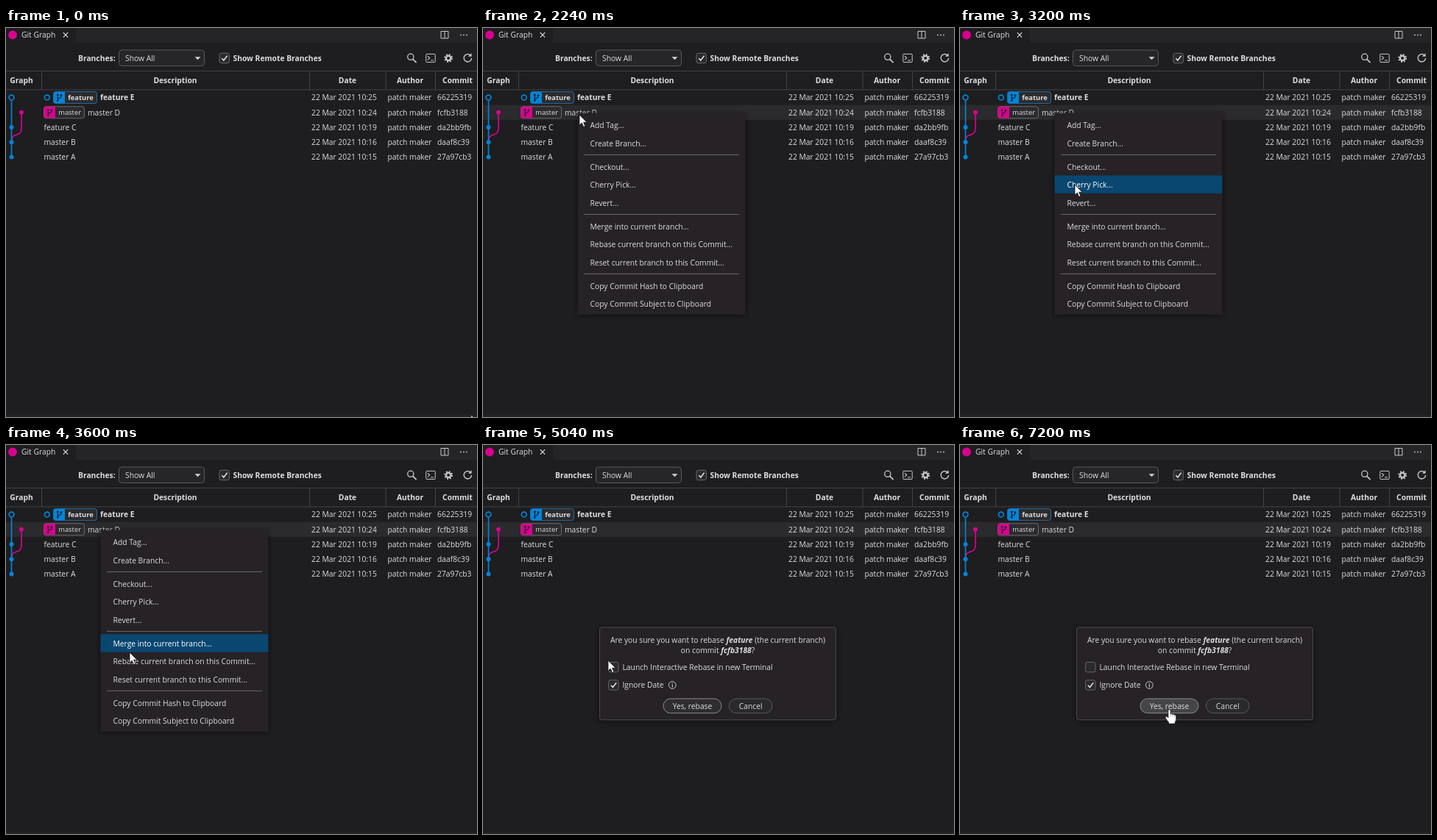
An HTML page that plays this animation: 640 px wide and 529 px high, repeating every 8 s.

```html
<!DOCTYPE html>
<html lang="en">
<head>
<meta charset="utf-8">
<title>Commit graph</title>
<style>
html, body { margin: 0; width: 100%; height: 100%; overflow: hidden; background: #1e1d20; }
svg { display: block; width: 640px; height: 529px; }
text { font: 10.3px "Open Sans", "Noto Sans", sans-serif; fill: #dedde0; white-space: pre; }
.b { font-weight: 700; }
.bi { font-weight: 700; font-style: italic; }
.s { font-size: 9.4px; }
.m { text-anchor: middle; }
.on { fill: #fff; }
</style>
</head>
<body>
<svg id="stage" viewBox="0 0 640 529" xmlns="http://www.w3.org/2000/svg">
  <defs>
    <filter id="shade" x="-20%" y="-20%" width="140%" height="140%">
      <feDropShadow dx="0" dy="1" stdDeviation="4" flood-color="#000" flood-opacity=".55"/>
    </filter>
  </defs>
  <rect width="640" height="529" fill="#1e1d20"/>
  <rect y="525.5" width="640" height="3.5" fill="#232225"/>
  <g id="bar"></g>
  <g id="table"></g>
  <g id="menu"></g>
  <g id="dialog"></g>
  <path id="arrow" d="M0 0V14.2L3.3 11.1L5.7 16.6L7.9 15.6L5.6 10.3H10.1Z" fill="#fff" stroke="#111" stroke-width=".8"/>
  <g id="hand" stroke="#151515" stroke-width=".8" stroke-linejoin="round">
    <path fill="#fff" d="M-1.6 1.2Q0 -1 1.6 1.2V6.4Q3.8 5 4.4 7Q6.3 5.6 7 7.6Q9.2 7 9.2 9.2V13.5Q9.2 15.5 7.7 17.2V19.6H-1V17.6Q-3 15.5 -5.2 11.8Q-6.2 9.6 -4.1 9.4Q-2.7 9.7 -1.6 11.4Z"/>
    <path fill="none" stroke="#777" stroke-width=".6" d="M1.6 7V10M4.4 7.2V10M7 8V10.4"/>
  </g>
</svg>
<script>
const BG = '#1e1d20', PANEL = '#252427', INK = '#c9c8ca', BLUE = '#0085d9', PINK = '#d9008f';
const LOOP = 8000, STEP = 80, PITCH = 20.2, TOP = 84.5;
const $ = id => document.getElementById(id);
const mid = row => TOP + PITCH * (row + 0.5);

const text = (x, y, str, cls = '') => `<text x="${x}" y="${y + 3.7}" class="${cls}">${str}</text>`;
const rect = (x, y, w, h, fill, stroke = 'none', r = 0, extra = '') =>
  `<rect x="${x}" y="${y}" width="${w}" height="${h}" rx="${r}" fill="${fill}" stroke="${stroke}" ${extra}/>`;
const line = (d, color = INK, w = 1, fill = 'none') =>
  `<path d="${d}" fill="${fill}" stroke="${color}" stroke-width="${w}"/>`;
const ring = (x, y, r, color, w, extra = '') =>
  `<circle cx="${x}" cy="${y}" r="${r}" fill="none" stroke="${color}" stroke-width="${w}" ${extra}/>`;
const dot = (x, y, r, color) => `<circle cx="${x}" cy="${y}" r="${r}" fill="${color}"/>`;

function checkbox(x, y, ticked) {
  const box = rect(x, y, 13.4, 13.4, '#2a292c', '#69686b', 2.5);
  return box + (ticked ? line(`M${x + 3.3} ${y + 7}l2.5 2.7 4.8-6.2`, '#e4e4e4', 1.5) : '');
}

function drawBar() {
  const tab = rect(0, 0, 640, 20, PANEL) + rect(0, 0, 95, 20, BG) +
    dot(9, 9.5, 6, PINK) + text(21, 9.5, 'Git Graph') +
    line('M77.8 6.2l6.4 6.4M84.2 6.2l-6.4 6.4', '#dddcde', 1.2);
  const split = line('M591 4.5h10v9.5h-10zM596 4.5v9.5') +
    [618, 622, 626].map(x => dot(x, 9.5, 0.9, INK)).join('');
  const filters = text(98, 41, 'Branches:', 'b') +
    rect(153.5, 30, 116, 21.5, '#262528', '#59585b', 4) + text(162, 41, 'Show All') +
    line('M256.5 39.2h8l-4 4z', 'none', 0, '#d2d1d3') +
    checkbox(290, 34.3, true) + text(308.5, 41, 'Show Remote Branches', 'b');
  const icons = ring(549.8, 39.3, 4.1, INK, 1.3) + line('M552.8 42.4l4.8 4.8', INK, 1.7) +
    rect(570.8, 35.4, 12.4, 11.2, 'none', INK, 1) + line('M573 38.2l2.7 2.6-2.7 2.6M577 44h4', INK, 1.1) +
    ring(601.2, 41, 3.2, INK, 2.2) + ring(601.2, 41, 4.9, INK, 2, 'stroke-dasharray="1.924"') +
    line('M631.2 37.2A5.2 5.2 0 1 0 632.6 41', INK, 1.4) + line('M632.6 34.2v4.6h-4.6z', 'none', 0, INK);
  $('bar').innerHTML = tab + split + filters + icons;
}

const branchIcon = (x, y) =>
  `<g transform="translate(${x} ${y})">` + line('M-2.2-3V3.4M2.4-2.2Q2.4.8-2.2 1.4', '#251d2a', 1.2) +
  [[-2.2, -3.7], [2.4, -3], [-2.2, 4]].map(p => dot(...p, 1.4, '#251d2a')).join('') + '</g>';

function badge(x, y, w, name, color, edge, cls) {
  return rect(x, y - 8, w, 16, '#2c2b2e', edge, 3) +
    line(`M${x + 15.5} ${y - 7.8}H${x + 3}q-3 0-3 3v9.6q0 3 3 3h12.5z`, 'none', 0, color) +
    branchIcon(x + 8, y) + text(x + 19.7, y - 0.2, name, 's ' + cls);
}

function drawTable() {
  const heads = [[21, 'Graph'], [230, 'Description'], [464, 'Date'], [549, 'Author'], [613.5, 'Commit']];
  const rows = [
    [128, 'feature E', '25', '66225319'], [111, 'master D', '24', 'fcfb3188'],
    [51.5, 'feature C', '19', 'da2bb9fb'], [51.5, 'master B', '16', 'daaf8c39'],
    [51.5, 'master A', '15', '27a97cb3']
  ];
  let out = rect(0, TOP, 640, PITCH, '#2b2a2d', 'none', 0, 'id="hover"');
  out += line('M0 58.5H640M0 84H640M48.5 58.5V84M412.5 58.5V84M516 58.5V84M583.5 58.5V84', '#434245');
  out += heads.map(([x, s]) => text(x, 71, s, 'b m')).join('');
  rows.forEach(([x, name, min, hash], i) => {
    const y = mid(i);
    out += text(x, y, name, i ? '' : 'b') + text(415, y, '22 Mar 2021 10:' + min) +
      text(518.5, y, 'patch maker') + text(586, y, hash);
  });
  out += line(`M21 ${mid(1)}V${mid(2)}C21 ${mid(3) - 4} 7.5 ${mid(2) + 4} 7.5 ${mid(3)}`, PINK, 1.7);
  out += line(`M7.5 ${mid(0) + 3.4}V${mid(4)}`, BLUE, 1.7) + ring(7.5, mid(0), 3.4, BLUE, 1.7);
  out += [2, 3, 4].map(i => dot(7.5, mid(i), 3, BLUE)).join('') + dot(21, mid(1), 3, PINK);
  out += ring(55.8, mid(0), 3.4, BLUE, 1.7);
  out += badge(64.5, mid(0), 59, 'feature', BLUE, '#2a6c9c', 'b');
  out += badge(51.5, mid(1), 55, 'master', PINK, '#6a696c', '');
  $('table').innerHTML = out;
}

const ITEMS = [
  [132.5, 'Add Tag...'], [157, 'Create Branch...'], [189, 'Checkout...'], [213.2, 'Cherry Pick...'],
  [238, 'Revert...'], [270, 'Merge into current branch...'], [294.3, 'Rebase current branch on this Commit...'],
  [319, 'Reset current branch to this Commit...'], [351, 'Copy Commit Hash to Clipboard'],
  [375.3, 'Copy Commit Subject to Clipboard']
];

function drawMenu() {
  $('menu').innerHTML = rect(128.5, 115.8, 227.8, 274, PANEL, 'none', 1, 'filter="url(#shade)"') +
    line('M137 172.4H348M137 253.4H348M137 334.3H348', '#69686b') +
    rect(128.5, 0, 227.8, 24.4, '#094771', 'none', 0, 'id="pick"') +
    ITEMS.map(([y, s]) => text(145.5, y, s, 'item')).join('');
}

function drawDialog() {
  const em = s => `<tspan class="bi">${s}</tspan>`;
  $('dialog').innerHTML = rect(158.5, 248, 321, 125.7, PANEL, '#4a494c', 3, 'filter="url(#shade)"') +
    text(319, 265, `Are you sure you want to rebase ${em('feature')} (the current branch)`, 'm') +
    text(319, 279, `on commit ${em('fcfb3188')}?`, 'm') +
    checkbox(170.6, 295.4, false) + text(189.5, 302, 'Launch Interactive Rebase in new Terminal') +
    checkbox(170.6, 319.8, true) + text(189.5, 326.4, 'Ignore Date') +
    ring(257.3, 326.5, 4.9, INK, 1) + line('M257.3 325.6V329.4M257.3 323.4V324.6', INK, 1.2) +
    rect(245, 345, 79, 19.6, '#2e2d30', '#8b8a8d', 9.8, 'id="yes"') + text(284.5, 354.8, 'Yes, rebase', 'm') +
    rect(334.3, 345, 58.7, 19.6, '#2a292c', '#59585b', 9.8) + text(363.7, 354.8, 'Cancel', 'm');
}

// Pointer path: time, x, y
const PATH = [
  [0, 632, 526], [400, 150, 172], [480, 150, 172], [880, 136.8, 128], [1280, 131, 118],
  [2880, 131, 118], [3200, 156, 213], [3600, 168, 282], [3760, 170, 293],
  [6320, 170, 293], [6800, 236, 334], [7200, 284.5, 359.5], [LOOP, 284.5, 359.5]
];

function pointer(t) {
  const i = PATH.findIndex(p => p[0] > t);
  const [t0, x0, y0] = PATH[i - 1], [t1, x1, y1] = PATH[i];
  const k = (t - t0) / (t1 - t0);
  return [x0 + (x1 - x0) * k, y0 + (y1 - y0) * k];
}

const show = (el, on) => el.setAttribute('visibility', on ? 'visible' : 'hidden');

function render(now) {
  const t = Math.floor((now % LOOP) / STEP) * STEP;
  const [x, y] = pointer(t);
  const menuOpen = t >= 1920 && t < 5040, asking = t >= 5040;

  const row = t >= 1280 ? 1 : Math.floor((y - TOP) / PITCH);
  const inRow = row >= 0 && row < 5;
  show($('hover'), inRow);
  if (inRow) $('hover').setAttribute('y', TOP + PITCH * row);

  show($('menu'), menuOpen);
  const picked = menuOpen && t >= 2960 ? ITEMS.findIndex(([c]) => Math.abs(y - c) <= 12.3) : -1;
  const pick = $('pick');
  pick.setAttribute('fill-opacity', picked < 0 ? 0 : 1);
  if (picked >= 0) pick.setAttribute('y', ITEMS[picked][0] - 12.7);
  items.forEach((el, i) => el.classList.toggle('on', i === picked));

  show($('dialog'), asking);
  const onYes = asking && x > 245 && y > 345;
  $('yes').setAttribute('fill', onYes ? '#454447' : '#2e2d30');

  const isHand = onYes || (!menuOpen && !asking && inRow);
  show($('hand'), isHand);
  show($('arrow'), !isHand);
  $(isHand ? 'hand' : 'arrow').setAttribute('transform', `translate(${x} ${y})`);
}

drawBar();
drawTable();
drawMenu();
drawDialog();
const items = [...document.querySelectorAll('.item')];
const start = performance.now();
function tick() {
  render(performance.now() - start);
  requestAnimationFrame(tick);
}
render(0);
requestAnimationFrame(tick);
</script>
</body>
</html>
```
